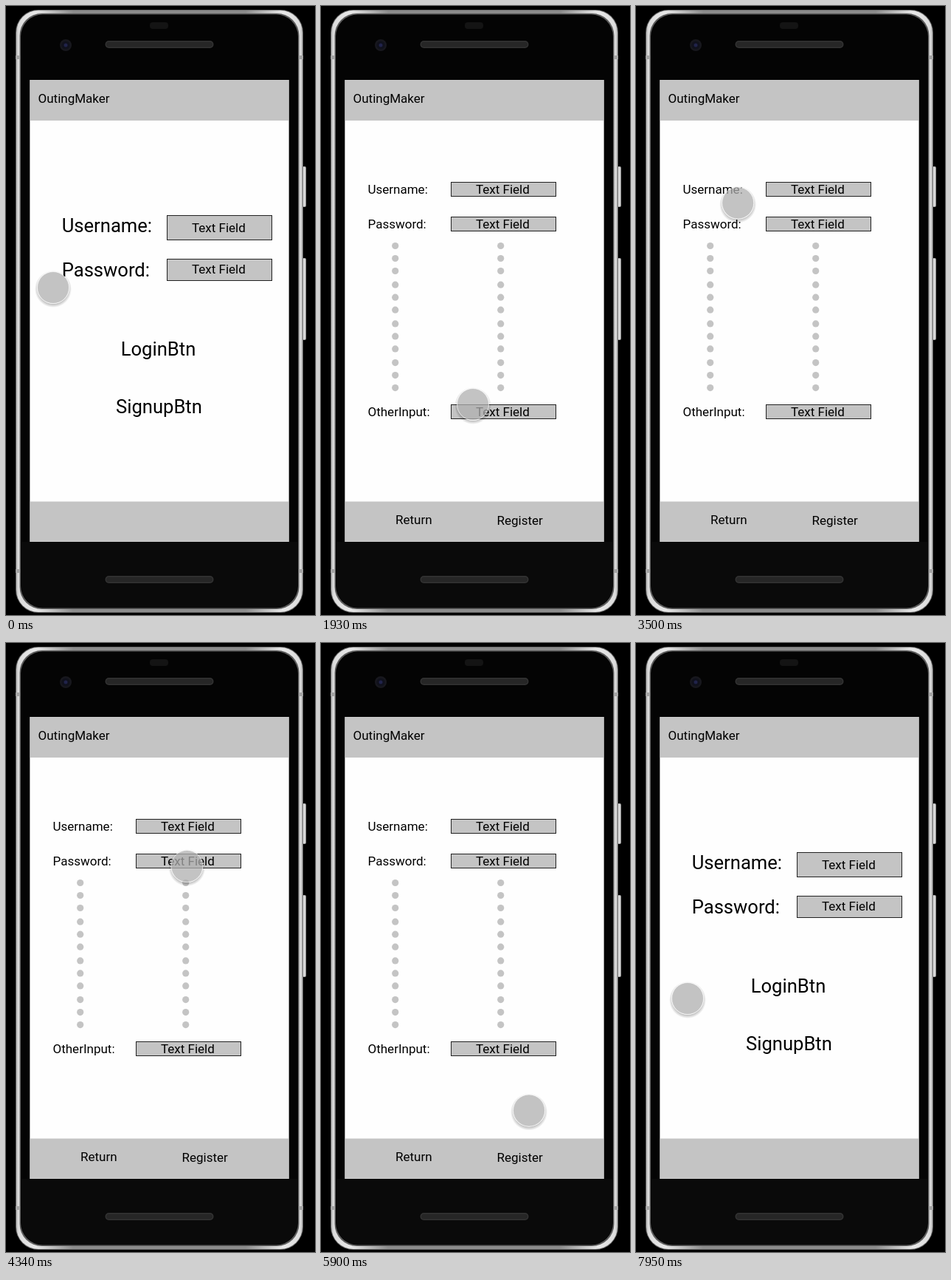
Animation, 419 px wide and 824 px high, one loop 8000 ms. Source, as an HTML page with a canvas:

```html
<!DOCTYPE html>
<html lang="en">
<head>
<meta charset="utf-8">
<style>
  html, body { margin: 0; width: 100%; height: 100%; overflow: hidden; background: #000; }
  canvas { display: block; }
</style>
</head>
<body>
<canvas id="stage" width="419" height="824"></canvas>
<script>
const ctx = document.getElementById('stage').getContext('2d');
const LOOP = 8000, STEP = 120;
const GREY = '#c4c4c4';

// Pointer paths through key points that are evenly spaced in time.
const PATHS = [
  { start: 0, gap: 280, points: [[64, 381], [165, 285], [355, 238], [361, 379],
    [248, 437], [209, 490], [206, 539]] },
  { start: 2180, gap: 480, points: [[206, 539], [28, 350], [85, 215], [166, 283],
    [347, 275], [115, 357], [66, 572], [186, 573], [300, 652], [266, 701]] },
  { start: 7230, gap: 720, points: [[266, 701], [70, 481]] }
];

function fillRound(x, y, w, h, r, fill) {
  ctx.fillStyle = fill;
  ctx.beginPath();
  ctx.roundRect(x, y, w, h, r);
  ctx.fill();
}

function circle(x, y, r) {
  ctx.beginPath();
  ctx.arc(x, y, r, 0, Math.PI * 2);
}

function disc(x, y, r, fill) {
  ctx.fillStyle = fill;
  circle(x, y, r);
  ctx.fill();
}

function rect(x, y, w, h, fill) {
  ctx.fillStyle = fill;
  ctx.fillRect(x, y, w, h);
}

function label(text, x, y, size = 17) {
  ctx.font = `${size}px Roboto, sans-serif`;
  ctx.fillStyle = '#000';
  ctx.fillText(text, x, y);
}

function field(x, y, h, baseline) {
  rect(x, y, 143, h, GREY);
  ctx.strokeStyle = '#222';
  ctx.lineWidth = 1;
  ctx.strokeRect(x + 0.5, y + 0.5, 142, h - 1);
  label('Text Field', x + 34, baseline);
}

function drawPhone() {
  rect(0, 0, 419, 824, '#000');
  for (const [y, h] of [[217, 55], [341, 111]]) {
    fillRound(400, y, 7, h, 2, '#aaa');
    fillRound(402, y + 1, 3.5, h - 2, 1, '#e2e2e2');
  }

  // Metal rim: bright at the corners, duller along the top and bottom.
  const metal = ctx.createLinearGradient(13, 0, 403, 0);
  for (const side of [0, 1]) {
    const stop = (at, color) => metal.addColorStop(Math.abs(side - at), color);
    stop(0, '#a8a8a8');
    stop(0.01, '#dcdcdc');
    stop(0.07, '#e8e8e8');
    stop(0.2, '#8c8c8c');
  }
  fillRound(13, 5, 390, 816, 31, '#666');
  fillRound(14, 6, 388, 814, 30, metal);
  fillRound(18.5, 10, 379, 806, 30, '#5c5c5c');
  fillRound(20, 11.5, 376, 803, 30, '#040404');
  for (const y of [67, 762]) {
    for (const x of [13, 397]) rect(x, y, 6, 5, '#a4a4a4');
  }

  fillRound(21, 725, 374, 89, [0, 0, 29, 29], '#0a0a0a');
  for (const y of [47, 771]) {
    fillRound(134.5, y, 147, 10, 5, '#333');
    fillRound(136, y + 1.5, 144, 7, 3.5, '#262626');
  }
  fillRound(195, 22, 25, 9, 4, '#141414');
  disc(81, 53, 8, '#18181e');
  disc(81, 53, 5.5, '#10111c');
  disc(81, 53, 2.5, '#20234a');
}

function drawLogin() {
  label('Username:', 75.7, 306, 25.6);
  label('Password:', 75.7, 366, 25.6);
  field(218, 283, 34, 306);
  field(218, 342, 30, 362);
  label('LoginBtn', 155.7, 473, 25.6);
  label('SignupBtn', 149, 551, 25.6);
}

function drawSignup() {
  const rows = [['Username:', 238, 254], ['Password:', 285, 300.5], ['OtherInput:', 539, 554.5]];
  for (const [text, top, baseline] of rows) {
    label(text, 63.5, baseline);
    field(176, top, 20, baseline);
  }
  for (let i = 0; i < 12; i++) {
    const group = Math.floor(i / 3);
    const y = 324.5 + 52.7 * group + 17 * (i % 3);
    for (const x of [100.7, 243.7]) disc(x, y, 4.6, GREY);
  }
  label('Return', 101, 701);
  label('Register', 238.5, 702);
}

function drawScreen(content) {
  rect(32, 100, 352, 625, '#aaa');
  rect(33, 100.5, 350, 624, '#fefefe');
  rect(33, 100.5, 350, 54.5, GREY);
  rect(33, 670.5, 350, 54, GREY);
  label('OutingMaker', 43.5, 131);
  content();
}

// Smooth curve through the points, at rest at both ends.
function along(points, position) {
  const last = points.length - 1;
  const i = Math.min(Math.floor(position), last - 1);
  const u = position - i, v = 1 - u;
  const slope = (k, axis) =>
    k === 0 || k === last ? 0 : (points[k + 1][axis] - points[k - 1][axis]) / 2;
  return [0, 1].map(axis =>
    points[i][axis] * (1 + 2 * u) * v * v + points[i + 1][axis] * u * u * (3 - 2 * u) +
    slope(i, axis) * u * v * v - slope(i + 1, axis) * u * u * v);
}

function pointerAt(t) {
  const { start, gap, points } = PATHS.findLast(path => path.start <= t);
  const elapsed = Math.floor((t - start) / STEP) * STEP;
  return along(points, Math.min(elapsed / gap, points.length - 1));
}

function drawPointer(x, y, pressed) {
  const shade = ctx.createRadialGradient(x, y + 2, 20, x, y + 2, 25);
  shade.addColorStop(0, 'rgba(0,0,0,.26)');
  shade.addColorStop(1, 'rgba(0,0,0,0)');
  ctx.fillStyle = shade;
  circle(x, y + 2, 25);
  ctx.moveTo(x + 22, y);
  ctx.arc(x, y, 22, 0, Math.PI * 2);
  ctx.fill('evenodd');
  disc(x, y, 21.5, pressed ? 'rgba(100,100,100,.5)' : 'rgba(176,176,176,.74)');
  ctx.strokeStyle = `rgba(255,255,255,${pressed ? 0.3 : 0.6})`;
  ctx.lineWidth = 1;
  circle(x, y, 21.5);
  ctx.stroke();
}

function draw(t) {
  drawPhone();
  drawScreen(t >= 1930 && t < 6980 ? drawSignup : drawLogin);
  drawPointer(...pointerAt(t), t >= 6860 && t < 6980);
}

const begin = performance.now();
function tick() {
  draw((performance.now() - begin) % LOOP);
  requestAnimationFrame(tick);
}
tick();
</script>
</body>
</html>
```
